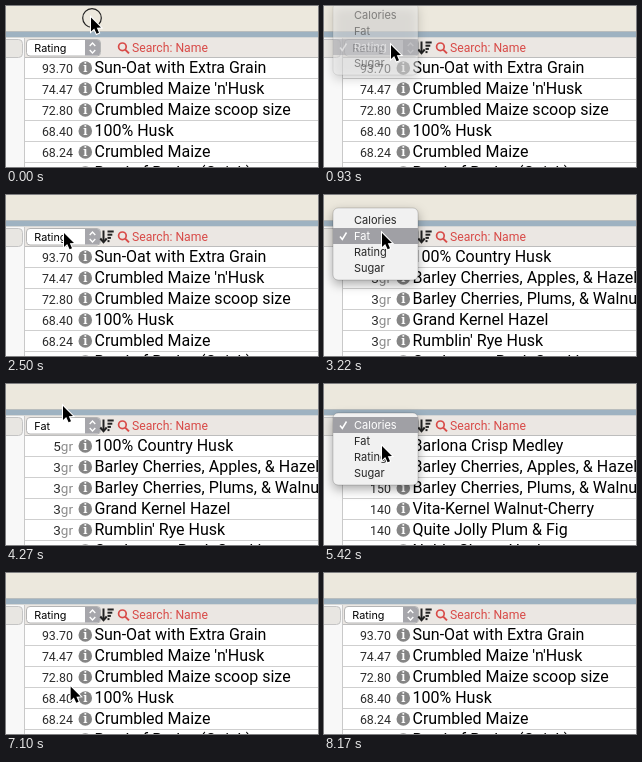
An HTML page with a canvas that plays this animation: 312 by 161 pixels, repeating every 8270 ms.

```html
<!DOCTYPE html>
<html lang="en">
<head>
<meta charset="utf-8">
<title>Sorting a list by attribute</title>
<style>
  html, body { margin: 0; width: 100%; height: 100%; overflow: hidden; background: #fff; }
  canvas { display: block; width: 312px; height: 161px; }
</style>
</head>
<body>
<canvas></canvas>
<script>
const W = 312, H = 161, LOOP = 8270;
const canvas = document.querySelector('canvas');
const ctx = canvas.getContext('2d');
const scale = window.devicePixelRatio || 1;
canvas.width = W * scale;
canvas.height = H * scale;

const LIST_FONT = 'Roboto, sans-serif';
const MENU_FONT = 'Inter, sans-serif';
const ATTRIBUTES = ['Calories', 'Fat', 'Rating', 'Sugar'];

const LISTS = {
  Rating: {
    values: ['93.70', '74.47', '72.80', '68.40', '68.24', '64.53'],
    names: ['Sun-Oat with Extra Grain', "Crumbled Maize 'n'Husk", 'Crumbled Maize scoop size',
            '100% Husk', 'Crumbled Maize', 'Bowl of Barley (Quick)']
  },
  Fat: {
    unit: 'gr',
    values: ['5', '3', '3', '3', '3', '3'],
    names: ['100% Country Husk', 'Barley Cherries, Apples, & Hazels', 'Barley Cherries, Plums, & Walnuts',
            'Grand Kernel Hazel', "Rumblin' Rye Husk", 'Cardamom Rusk Crackle']
  },
  Calories: {
    values: ['160', '150', '150', '140', '140', '140'],
    names: ['Barlona Crisp Medley', 'Barley Cherries, Apples, & Hazels', 'Barley Cherries, Plums, & Walnuts',
            'Vita-Kernel Walnut-Cherry', 'Quite Jolly Plum & Fig', 'Noble Cherry Husk']
  }
};

// [time, attribute]: the label switches just before the list does.
const LABELS = [[0, 'Rating'], [2590, 'Fat'], [4440, 'Calories'], [6770, 'Rating']];
const SORTS = [[0, 'Rating'], [2680, 'Fat'], [4500, 'Calories'], [6860, 'Rating']];

// firstRow: centre of the first item; blink: the click flashes the highlight off.
const MENUS = [
  { open: 930, blink: 1970, blinkEnd: 2030, close: 2250, firstRow: 9, checked: 2 },
  { open: 3070, blink: 3970, blinkEnd: 4030, close: 4230, firstRow: 25, checked: 1 },
  { open: 5180, blink: 6600, blinkEnd: 6650, close: 6860, firstRow: 41, checked: 0 }
];

// [time, x, y] of the pointer tip
const POINTER = [
  [0, 85, 11.5], [50, 85, 11.5], [690, 67, 39], [1250, 67, 39], [1490, 64, 28],
  [1720, 64, 28], [1810, 62, 12], [1940, 61, 24], [2250, 61, 24], [2500, 58, 38],
  [3440, 58, 38], [3800, 57, 22], [4440, 57, 22], [4590, 57, 38], [4890, 57, 38],
  [4940, 57, 39], [5400, 57, 39], [5420, 58, 62], [5480, 58, 62], [5720, 56, 89],
  [5890, 56, 89], [6300, 55, 77], [6780, 55, 77], [7500, 78, 164], [LOOP, 78, 164]
];

const clamp = v => Math.max(0, Math.min(1, v));
const current = (steps, t) => steps.filter(([start]) => start <= t).pop()[1];

function pointerAt(t) {
  const i = Math.max(1, POINTER.findIndex(([time]) => time > t));
  const [t0, x0, y0] = POINTER[i - 1], [t1, x1, y1] = POINTER[i];
  const u = clamp((t - t0) / (t1 - t0)), ease = u * u * (3 - 2 * u);
  return { x: x0 + (x1 - x0) * ease, y: y0 + (y1 - y0) * ease };
}

function rect(x, y, w, h, color) {
  ctx.fillStyle = color;
  ctx.fillRect(x, y, w, h);
}

function roundRect(x, y, w, h, radius, fill, stroke) {
  ctx.beginPath();
  ctx.roundRect(x, y, w, h, radius);
  if (fill) { ctx.fillStyle = fill; ctx.fill(); }
  if (stroke) { ctx.strokeStyle = stroke; ctx.lineWidth = 1; ctx.stroke(); }
}

function text(str, x, y, font, color, align = 'left') {
  ctx.font = font;
  ctx.fillStyle = color;
  ctx.textAlign = align;
  ctx.fillText(str, x, y);
}

function line(points, color, width) {
  ctx.beginPath();
  points.forEach(([x, y]) => ctx.lineTo(x, y));
  ctx.strokeStyle = color;
  ctx.lineWidth = width;
  ctx.stroke();
}

function drawFrame() {
  rect(0, 0, W, H, '#fff');
  rect(0, 0, W, 25, '#ece8dd');
  rect(0, 25, W, 1, '#b9bdbd');
  rect(0, 26, W, 5, '#9eb2c1');
  rect(0, 31, W, 1, '#d5d7d6');
  rect(0, 32, 18, H, '#f8f8f8');
  roundRect(-8, 33.5, 24.5, 18, 4, '#e8e6e2', '#c4c4c4');
  rect(18, 32, 1, H, '#c9c9c9');
  rect(19, 32, W, 19, '#ebe7e3');
  rect(19, 51, W, 1, '#bdbdbd');
}

function drawRows(list) {
  const size = list.unit ? 13.5 : 12.4;
  list.names.forEach((name, i) => {
    const base = 66 + 21 * i;
    rect(19, base + 6, W, 1, '#cfcfcf');
    const font = `${size}px ${LIST_FONT}`;
    let right = 67;
    if (list.unit) {
      text(list.unit, right, base + 1, font, '#8c8c8c', 'right');
      right -= ctx.measureText(list.unit).width;
    }
    text(list.values[i], right, base + 1, font, '#2c2c2c', 'right');

    ctx.beginPath();
    ctx.arc(79.3, base - 4, 6.8, 0, 7);
    ctx.fillStyle = '#858585';
    ctx.fill();
    text('i', 79.3, base, 'bold 12px "Noto Serif", serif', '#fff', 'center');
    text(name, 88.5, base + .5, `16px ${LIST_FONT}`, '#000');
  });
}

function drawSelect(label) {
  roundRect(20.5, 33.5, 74, 16.5, 3.5, '#fff', '#b4b4b4');
  roundRect(79, 34, 15, 15.5, [0, 3, 3, 0], '#a6a6ab');
  line([[83.7, 40], [86.5, 37], [89.3, 40]], '#fff', 1.3);
  line([[83.7, 44], [86.5, 47], [89.3, 44]], '#fff', 1.3);
  text(label, 28.3, 45.8, `10.8px ${MENU_FONT}`, '#000');
}

function drawSortIcon() {
  const color = '#222';
  line([[97.5, 35.5], [97.5, 47]], color, 2);
  line([[94.3, 43.5], [97.5, 47.2], [100.7, 43.5]], color, 2);
  for (let i = 0; i < 4; i++) rect(101.5, 35.5 + 3.2 * i, 6.2 - 1.4 * i, 2, color);
}

function drawSearch() {
  const color = '#d84b48';
  ctx.beginPath();
  ctx.arc(116.4, 40.8, 3.8, 0, 7);
  ctx.strokeStyle = color;
  ctx.lineWidth = 1.7;
  ctx.stroke();
  line([[119.2, 43.6], [123, 47.4]], color, 2);
  text('Search: Name', 126, 45.6, `12.2px ${LIST_FONT}`, color);
}

function drawMenu(menu, t) {
  const { open, blink, blinkEnd, close, firstRow, checked } = menu;
  if (t < open || t >= close) return;
  ctx.save();
  ctx.globalAlpha = t < blinkEnd
    ? clamp(.5 + (t - open) / 120)
    : 1 - clamp((t - blinkEnd) / (close - blinkEnd));
  ctx.shadowColor = 'rgba(0,0,0,.35)';
  ctx.shadowBlur = 11 * scale;
  ctx.shadowOffsetY = 4 * scale;
  roundRect(9, firstRow - 12, 85, 72, 5, '#f1f1f1');
  ctx.shadowColor = 'transparent';
  roundRect(9, firstRow - 12, 85, 72, 5, null, 'rgba(0,0,0,.16)');

  // The highlight trails the pointer slightly.
  const hovered = Math.floor((pointerAt(t - 60).y - firstRow + 8) / 16);
  const blinking = t >= blink && t < blinkEnd;
  ATTRIBUTES.forEach((name, i) => {
    const y = firstRow + 16 * i;
    const lit = i === hovered && !blinking;
    const color = lit ? '#fff' : '#262626';
    if (lit) rect(9, y - 8, 85, 16, '#a0a0a5');
    if (i === checked) line([[16, y + .5], [18.3, y + 3.5], [22.5, y - 3.5]], color, 1.5);
    text(name, 30, y + 4, `11px ${MENU_FONT}`, color);
  });
  ctx.restore();
}

function drawPointer(t) {
  const { x, y } = pointerAt(t);
  ctx.save();
  ctx.translate(x, y);
  if (t < 60) {
    ctx.beginPath();
    ctx.arc(1, .5, 9.3, 0, 7);
    ctx.strokeStyle = '#222';
    ctx.lineWidth = 1.2;
    ctx.stroke();
  }
  ctx.beginPath();
  [[0, 0], [0, 14], [3.2, 11], [5.6, 16.3], [8, 15.2], [5.8, 10.2], [10, 10]]
    .forEach(([px, py]) => ctx.lineTo(px, py));
  ctx.closePath();
  ctx.strokeStyle = '#fff';
  ctx.lineWidth = 2;
  ctx.stroke();
  ctx.fillStyle = '#000';
  ctx.fill();
  ctx.restore();
}

const start = performance.now();

function draw(now) {
  const t = Math.max(0, now - start) % LOOP;
  ctx.setTransform(scale, 0, 0, scale, 0, 0);
  drawFrame();
  drawRows(LISTS[current(SORTS, t)]);
  drawSelect(current(LABELS, t));
  if (t >= 400) drawSortIcon();
  drawSearch();
  MENUS.forEach(menu => drawMenu(menu, t));
  drawPointer(t);
  requestAnimationFrame(draw);
}
requestAnimationFrame(draw);
</script>
</body>
</html>
```
